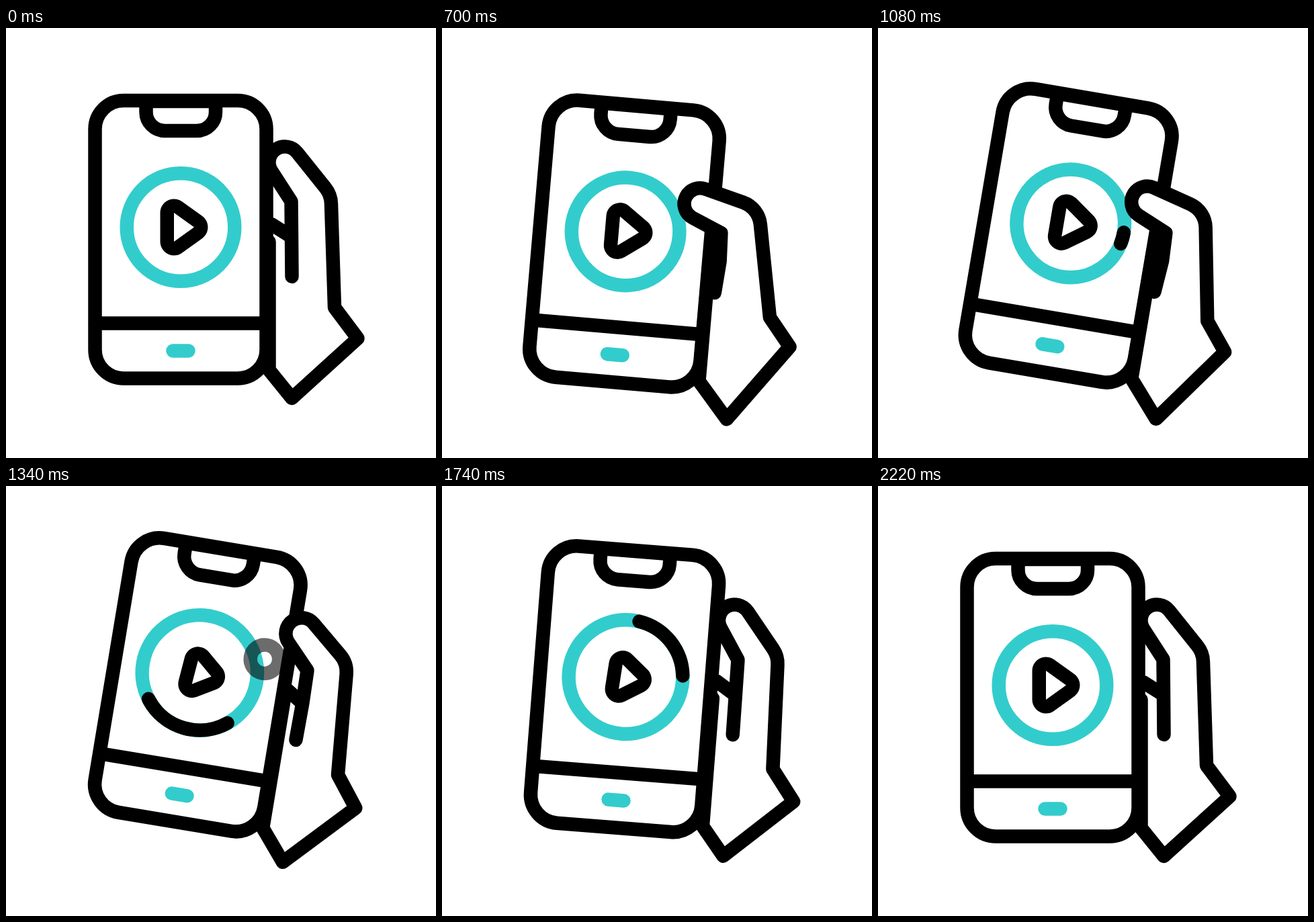
Write an HTML page with a canvas that moves like this. It is 640 px wide and 640 px high and loops after 2.62 s.

```html
<!DOCTYPE html>
<html>
<head>
<meta charset="utf-8">
<style>
  html, body { margin: 0; height: 100%; overflow: hidden; background: #fff; }
  canvas { display: block; }
</style>
</head>
<body>
<canvas width="640" height="640"></canvas>
<script>
const ctx = document.querySelector('canvas').getContext('2d');
const LOOP = 2620, LINE = 20.5, THUMB_R = 23.5, TURN = 2 * Math.PI;
const TEAL = '#33cccc';

// Each joint of the hand: [x, y] at rest and [x, y] with the thumb pressing
const HAND = {
  creaseEnd: [[425.5, 370], [400, 396]],
  crease: [[425, 311], [403.8, 348.7]],
  thumbRoot: [[424.5, 258], [402, 306.5]],
  thumb: [[415, 200], [367, 266]],
  knuckle: [[483.5, 248], [454.5, 264.5]],
  wrist: [[489, 416], [485, 425.5]],
  corner: [[523.5, 462], [518.3, 466.6]],
  bottom: [[425.5, 551], [434, 582]],
  palmLow: [[391.5, 509], [388, 529]],
  palmTop: [[391.5, 318], [388, 338]]
};

function ease(t, from, to) {
  const u = Math.min(1, Math.max(0, (t - from) / (to - from)));
  return u * u * (3 - 2 * u);
}

function stroke(color = '#000', width = LINE) {
  ctx.strokeStyle = color;
  ctx.lineWidth = width;
  ctx.stroke();
}

function line(x1, y1, x2, y2, color) {
  ctx.beginPath();
  ctx.moveTo(x1, y1);
  ctx.lineTo(x2, y2);
  stroke(color);
}

function arc(x, y, radius, from, to, color) {
  ctx.beginPath();
  ctx.arc(x, y, radius, from * TURN, to * TURN);
  stroke(color);
}

function drawPhone() {
  ctx.beginPath();
  ctx.roundRect(132.5, 108, 255, 413.5, 42.5);
  ctx.fill();
  stroke();
  ctx.beginPath();
  ctx.moveTo(208.5, 109);
  ctx.arcTo(208.5, 153, 260, 153, 28);
  ctx.arcTo(312, 153, 312, 109, 28);
  ctx.lineTo(312, 109);
  ctx.closePath();
  stroke();
  line(133, 439.5, 387, 439.5);
  line(248.5, 480.5, 271.5, 480.5, TEAL);
}

function drawPlayer(t) {
  const pulse = ease(t, 1100, 1500) - ease(t, 1600, 1900);
  const head = ease(t, 990, 1800), tail = ease(t, 1130, 2010);
  const radius = 80.3 + 8.3 * pulse, s = 1 - .25 * pulse;
  ctx.translate(260, 296.5);
  arc(0, 0, radius, 0, 1, TEAL);
  if (head > tail) arc(0, 0, radius, tail, head);

  ctx.translate(2 * pulse, 2 * pulse);
  ctx.rotate(.14 * pulse);
  ctx.beginPath();
  ctx.moveTo(-10 * s, -21.5 * s);
  ctx.lineTo(-10 * s, 21.5 * s);
  ctx.lineTo(20 * s, 0);
  ctx.closePath();
  stroke('#000', 2 * LINE);
  ctx.fill();
}

function drawRipple(t) {
  const u = (t - 1140) / 472;
  if (u <= 0 || u >= 1) return;
  ctx.globalAlpha = 1 - u;
  arc(352, 267, 10 + 29 * ease(u, 0, 1), 0, 1);
  ctx.globalAlpha = 1;
}

function drawHand(joint) {
  const [tx, ty] = joint.thumb;
  // Angle at which a line from a joint touches the round thumb tip
  const touch = ([x, y], side) =>
    Math.atan2(y - ty, x - tx) + side * Math.acos(THUMB_R / Math.hypot(x - tx, y - ty));
  ctx.beginPath();
  for (const name of ['creaseEnd', 'crease', 'thumbRoot']) ctx.lineTo(...joint[name]);
  ctx.arc(tx, ty, THUMB_R, touch(joint.thumbRoot, 1), touch(joint.knuckle, -1));
  ctx.arcTo(...joint.knuckle, ...joint.wrist, 39);
  for (const name of ['wrist', 'corner', 'bottom', 'palmLow', 'palmTop']) ctx.lineTo(...joint[name]);
  ctx.fill();
  stroke();
}

function draw(now) {
  const t = Math.floor(now % LOOP / 20) * 20;
  const tilt = ease(t, 220, 1190) - ease(t, 1190, 2220);
  const press = ease(t, 220, 530) - ease(t, 1120, 1470);
  const joint = {};
  for (const name in HAND) {
    const [rest, pressed] = HAND[name];
    joint[name] = rest.map((v, i) => v + (pressed[i] - v) * press);
  }

  ctx.fillStyle = '#fff';
  ctx.fillRect(0, 0, 640, 640);
  ctx.lineCap = ctx.lineJoin = 'round';

  // Phone and hand swing together around the wrist
  ctx.save();
  ctx.translate(425, 462);
  ctx.rotate(tilt * TURN / 36);
  ctx.translate(-425, -462);
  const [x, y] = joint.crease;
  line(x - 30, y - 19, x, y);
  ctx.save();
  ctx.translate(0, 20 * press);
  drawPhone();
  drawPlayer(t);
  ctx.restore();
  drawRipple(t);
  drawHand(joint);
  ctx.restore();
}

const start = performance.now();
function tick() {
  draw(performance.now() - start);
  requestAnimationFrame(tick);
}
tick();
</script>
</body>
</html>
```
